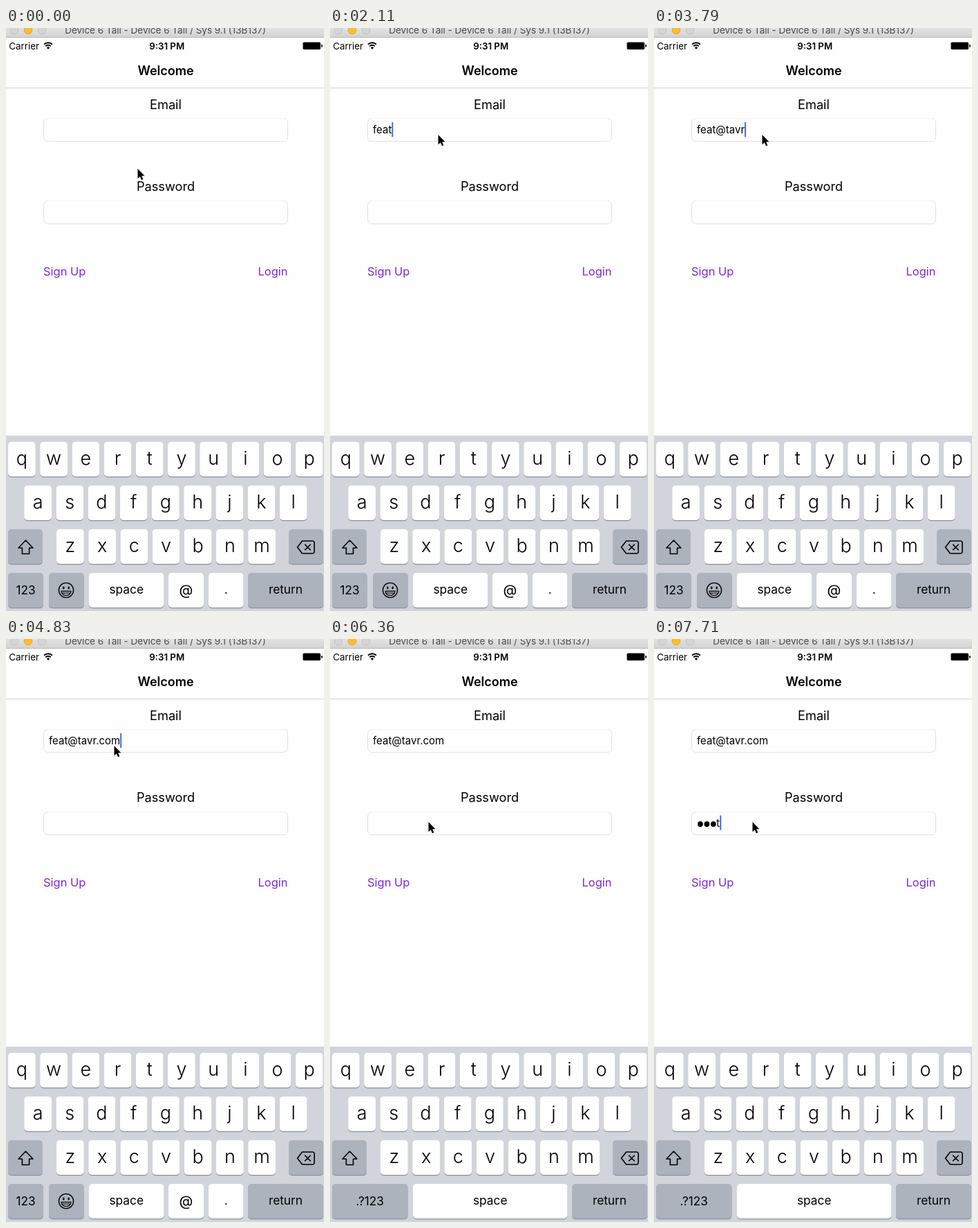
Write an HTML page that moves like this. It is 460 px wide and 841 px high and loops after 8000 ms.

```html
<!DOCTYPE html>
<html lang="en">
<head>
<meta charset="utf-8">
<title>Welcome</title>
<style>
  html, body { margin: 0; width: 460px; height: 841px; overflow: hidden; background: #fefefe; }
  svg { display: block; font-family: Inter, Roboto, sans-serif; }
  text { white-space: pre; }
  .mid { text-anchor: middle; }
  .line { fill: none; stroke: #000; stroke-width: 1.6; stroke-linejoin: round; stroke-linecap: round; }
  .link { fill: #7d26d9; font-size: 16.5px; }
  .label { font-size: 18.2px; }
  .field { font-size: 15px; }
  .letter { font-size: 27px; font-weight: 300; }
  .word { font-size: 17.3px; }
</style>
</head>
<body>
<svg id="stage" width="460" height="841" viewBox="0 0 460 841">
  <defs>
    <linearGradient id="bar" x2="0" y2="1">
      <stop offset="0" stop-color="#e2e2e2"/>
      <stop offset="1" stop-color="#d3d3d3"/>
    </linearGradient>
  </defs>
  <rect width="460" height="841" fill="#fefefe"/>

  <!-- window bar -->
  <rect width="460" height="13" fill="url(#bar)"/>
  <rect y="13" width="460" height="1" fill="#b9b9b9"/>
  <g fill="#d5d5d5" stroke="#c2c2c2">
    <circle cx="12" cy="3" r="5.8"/>
    <circle cx="32" cy="3" r="5.8" fill="#fdbd2e" stroke="#e6a626"/>
    <circle cx="52" cy="3" r="5.8"/>
  </g>
  <text class="mid" x="230.5" y="8" font-size="13.5" fill="#4a4a4a">Device 6 Tall - Device 6 Tall / Sys 9.1 (13B137)</text>

  <!-- status and navigation -->
  <text x="4.3" y="30.7" font-size="13.4">Carrier</text>
  <g fill="none" stroke="#000" stroke-width="2">
    <path d="M55 23.6a8.6 8.6 0 0 1 12 0M57.2 26.3a5.4 5.4 0 0 1 7.6 0"/>
    <path d="M61 30.8l-2.2-2.4a3 3 0 0 1 4.4 0z" fill="#000" stroke="none"/>
  </g>
  <text class="mid" x="232.7" y="30.7" font-size="13.3" font-weight="600">9:31 PM</text>
  <rect x="429.5" y="20.5" width="25.5" height="10.5" rx="1.8"/>
  <path d="M456 23.8a2 2 0 0 1 0 4z"/>
  <text class="mid" x="231" y="68" font-size="18" font-weight="600">Welcome</text>
  <rect y="86" width="460" height="1" fill="#d2d2d2"/>

  <!-- form -->
  <text class="label mid" x="231" y="117">Email</text>
  <text class="label mid" x="231" y="235.3">Password</text>
  <g id="boxes" fill="none"></g>
  <text class="link" x="54" y="357">Sign Up</text>
  <text class="link" x="407.5" y="357" text-anchor="end">Login</text>
  <text id="email" class="field" x="62" y="152"></text>
  <g id="dots"></g>
  <text id="last" class="field" y="271"></text>
  <rect id="caret" width="2" height="21" fill="#4169e1"/>

  <!-- keyboard -->
  <rect y="588" width="460" height="253" fill="#d1d5db"/>
  <g id="keys"></g>
  <g id="mailRow"></g>
  <g id="passRow"></g>
  <path class="line" d="M28.5 739L39 750H33.6V758.5H23.4V750H18z"/>
  <path class="line" d="M428.5 740H443.5a2.5 2.5 0 0 1 2.5 2.5V755.5a2.5 2.5 0 0 1-2.5 2.5H428.5L421.5 749zM432.6 745.2l7.6 7.6M440.2 745.2l-7.6 7.6"/>

  <path id="pointer" d="M0 0V14.2L3.3 11.2L5.5 16.3L7.9 15.3L5.7 10.3H10z" stroke="#fff" stroke-width="1" paint-order="stroke"/>
</svg>
<script>
const $ = id => document.getElementById(id);
const LOOP = 8000;
const ADDRESS = "feat@tavr.com";
const SECRET = "test";
const DOT = 9.45;

// Key times of each typed character
const mailTimes = [1370, 1670, 1810, 2110, 3010, 3340, 3490, 3640, 3790, 4390, 4540, 4680, 4830];
const passTimes = [7110, 7260, 7560, 7710];

// time, opacity
const blink = [
  [0, 0], [150, .5], [330, 1], [775, .5], [920, 0], [1220, 1], [2560, .5], [2710, 0],
  [3010, 1], [5310, .5], [5460, 0], [5910, 1], [6360, 0], [6510, 1], [6960, 0], [7110, 1]
];

// time, x, y
const track = [
  [0, 190.5, 203], [330, 179.5, 163], [630, 170, 157], [775, 160, 154.5], [920, 156.5, 154],
  [5160, 151, 180], [5310, 134, 238], [5460, 116, 280], [5610, 110.5, 290],
  [5910, 126, 277], [6060, 142.5, 264]
];

const at = (list, t) => list.filter(k => k[0] <= t).pop();
const typed = (times, t) => times.filter(k => k <= t).length;

function key(x, y, w, label = "", cls = "letter", fill = "#fefefe", base = 33) {
  return `<rect x="${x}" y="${y + 1.2}" width="${w}" height="50" rx="5" fill="#8b8f96"/>
    <rect x="${x}" y="${y}" width="${w}" height="50" rx="5" fill="${fill}"/>
    <text class="${cls} mid" x="${x + w / 2}" y="${y + base}">${label}</text>`;
}
const GREY = "#adb3bd";
const wordKey = (x, w, label, fill, base = 30) => key(x, 786, w, label, "word", fill, base);
const row = (letters, x, y) =>
  [...letters].map((c, i) => key(x + i * 46.2, y, 39.8, c)).join("");

function build() {
  $("boxes").innerHTML = [130, 249].map(y =>
    `<path d="M60.5 ${y + .5}H401.5" stroke="#f4f4f4"/>
     <path d="M60.5 ${y + .5}a6 6 0 0 0 -6 6V${y + 27.5}a6 6 0 0 0 6 6H401.5a6 6 0 0 0 6 -6V${y + 6.5}a6 6 0 0 0 -6 -6" stroke="#e1e1e1"/>`
  ).join("");

  $("keys").innerHTML =
    row("qwertyuiop", 3, 597) + row("asdfghjkl", 26.2, 660) + row("zxcvbnm", 73, 723) +
    key(3, 723, 50, "", "word", GREY) + key(409, 723, 50, "", "word", GREY) +
    wordKey(350, 109, "return", GREY);

  $("mailRow").innerHTML =
    wordKey(3, 51, "123", GREY, 31) + wordKey(62, 51, "", GREY) + wordKey(120, 108.5, "space") +
    key(235, 786, 51, "@", "mail", "#fefefe", 31.5) + wordKey(293, 50.5, ".") +
    `<circle class="line" cx="87" cy="811" r="10.6" style="stroke-width:1.4"/>
     <ellipse cx="83.3" cy="807.5" rx="1.3" ry="2"/><ellipse cx="90.7" cy="807.5" rx="1.3" ry="2"/>
     <path class="line" d="M80 812.3H94a7 6.2 0 0 1 -14 0zM81 815H93" style="stroke-width:1.2"/>`;
  $("mailRow").querySelector(".mail").setAttribute("font-size", 20.5);

  $("passRow").innerHTML = wordKey(3, 109.5, ".?123", GREY, 31) + wordKey(120, 223.5, "space");
}

function draw(t) {
  const n = typed(mailTimes, t), p = typed(passTimes, t);
  const onPass = t >= 6510, hidden = Math.max(p - 1, 0);
  const email = $("email"), last = $("last"), caret = $("caret");

  email.textContent = ADDRESS.slice(0, n);
  $("dots").innerHTML = Array.from({ length: hidden }, (_, i) =>
    `<circle cx="${67 + i * DOT}" cy="267" r="3.9"/>`).join("");
  const lastX = 62 + hidden * DOT;
  last.setAttribute("x", lastX);
  last.textContent = p ? SECRET[p - 1] : "";

  const width = onPass ? (p ? last.getComputedTextLength() : 0) : (n ? email.getComputedTextLength() : 0);
  caret.setAttribute("x", (onPass ? lastX : 62) + width);
  caret.setAttribute("y", onPass ? 254.5 : 136);
  caret.setAttribute("opacity", at(blink, t)[1]);

  const swapped = t >= 6360;
  $("mailRow").style.display = swapped ? "none" : "";
  $("passRow").style.display = swapped ? "" : "none";

  const [, x, y] = at(track, t);
  $("pointer").setAttribute("transform", `translate(${x} ${y})`);
}

build();
draw(0);
const start = performance.now();
function tick() {
  draw((performance.now() - start) % LOOP);
  requestAnimationFrame(tick);
}
requestAnimationFrame(tick);
</script>
</body>
</html>
```
